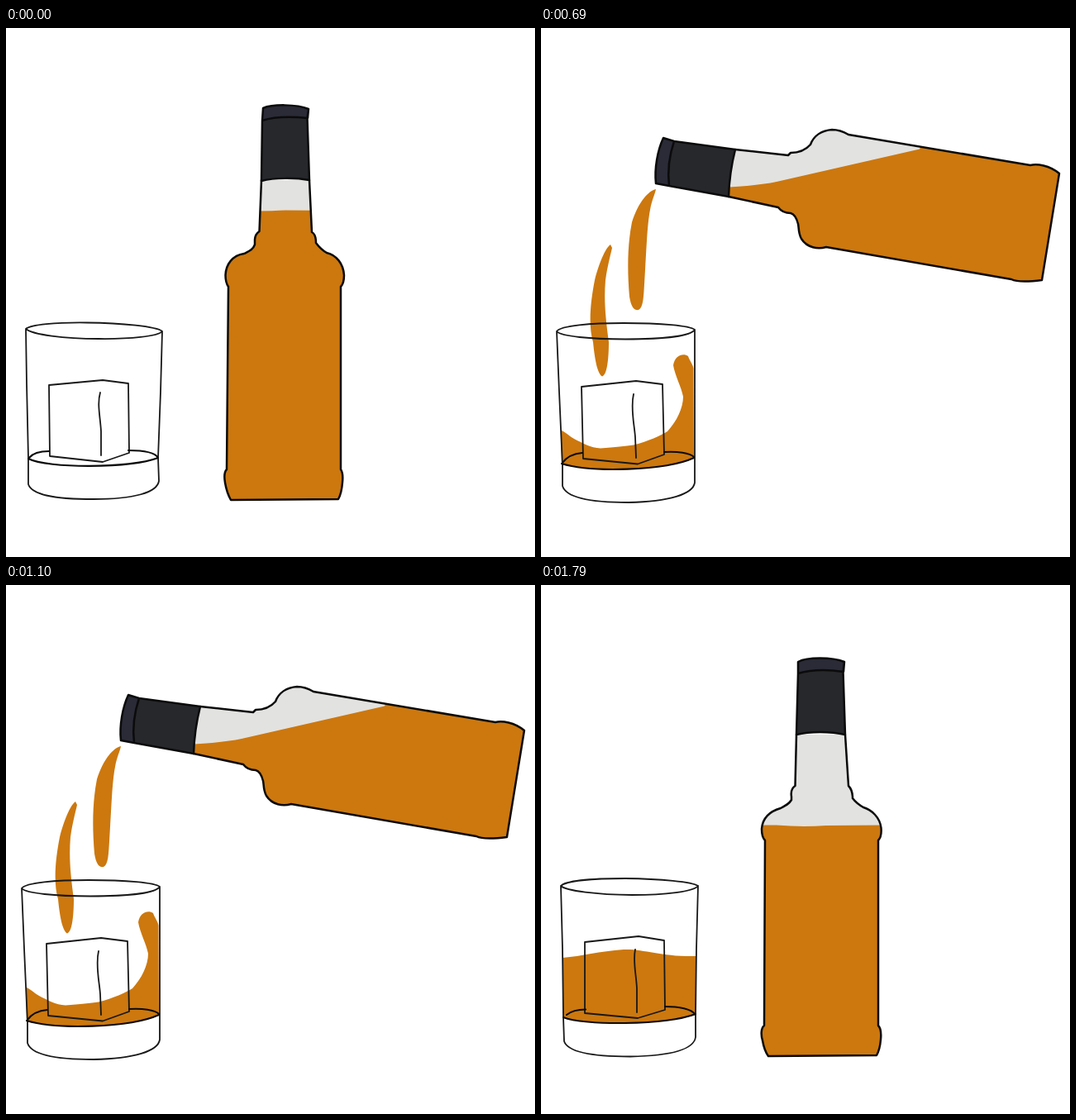
Animation of 640 by 640 pixels, one loop 2.07 s. Source, as an HTML page:

```html
<!DOCTYPE html>
<html lang="en">
<head>
<meta charset="utf-8">
<title>Pouring a drink</title>
<style>
html, body { margin: 0; width: 100%; height: 100%; overflow: hidden; background: #fff; }
svg { display: block; width: 100vw; height: 100vh; }
.line { fill: none; stroke: #0b0b0b; stroke-linecap: round; stroke-linejoin: round; }
.glass { stroke: #181818; stroke-width: 1.8; }
.base { stroke-width: 2.1; }
.bottle { stroke-width: 2.5; }
.drink { fill: #cc780f; }
.empty { fill: #e2e2e0; }
.cap { fill: #27282c; }
.lid { fill: #2a2b37; }
</style>
</head>
<body>
<svg id="stage" viewBox="0 0 640 640"></svg>
<script>
const STEP = 690;

const poses = [
  {
    body: 'M309 184L306.5 246C302 249 301 253 301 257L301 262C299 268 294 270 288 273C274 275 266 286 265.5 299C265.5 306 267 310 269 313L267 534C264 537 264 544 265 550Q267 562 272 571L402 570Q406 563 407 550C408 541 407 537 405 534L405 313C408 310 409 305 409 299C408 285 400 275 388 272C381 268 378 264 375 260C375 253 374 249 370 247L367 184',
    level: 'M250 221.5Q310 222 338 220.5L420 221V580H250Z',
    cap: 'M311 97C322 92 352 92 366 98L364.5 109L367 184C350 181 325 181 309 185L310 112Z',
    lid: 'M311 97C322 92 352 92 366 98L365 109C345 107 325 107 310 112Z',
    fill: '',
    rim: 'M24 364C30 359 60 356 98 356.5C140 357 182 361 189 367C184 373 150 376.5 112 376C70 376 32 371 24 364Z',
    sides: 'M24 364L25 430L27 520L27 552C31 564 55 570 106 570C155 570 183 562 185 548L184 520L187 440L189 367',
    base: 'M27 521C50 533 150 533 184 520M28 520C32 515 40 512 52 512M148 511C165 511 180 513 184 520',
    cube: 'M52 432L117 426L148 430L149 514L117 525L53 518ZM114 441C110 455 114 470 115 488L115 517'
  },
  {
    body: 'M235 147L299 154L302 151C310 151 319 149 326 141C330 130 340 124 352 123C360 123 367 126 372 129L592 166C600 164 615 166 627 176L606 305C590 307 575 307 569 304L345 265C335 268 322 266 315 255C311 248 312 240 311 237C309 229 306 225 302 224C295 224 290 221 287 217L227 204',
    level: 'M220 193L228 192.5C250 191 268 189.5 285 186L458 146.5L470 120H640V320H220Z',
    cap: 'M148 133L161 137L235 147Q228 175 227 204L155 191L139 188C137 170 141 148 148 133Z',
    lid: 'M148 133L161 137C155 155 153 174 155 191L139 188C137 170 141 148 148 133Z',
    fill: 'M24 486.5C31 490 36 495 40 497C50 502 60 508 72 508.5C90 507 102 506 112 504.5C130 500 145 493 153 488C164 476 172 460 172 446C170 435 162 420 160 408C162 396 172 393 178 397C180 403 184 407 184.5 412L185 521C150 535 60 537 25 528Z' +
      'M139 195C130 197 118 210 110 235C105 260 104 290 107 325C109 338 113 342 118 341C124 338 124 325 125 310C127 280 128 240 132 220C134 208 138 201 139 195Z' +
      'M84 262C78 266 70 285 65 305C60 330 57 360 63 380C65 400 68 418 74 421.5C80 420 82 400 82 380C78 350 76 330 78 305C80 290 84 275 86 266Z',
    rim: 'M19 367C24 360 60 357 100 357C145 357 180 360 186 365C181 373 145 376.5 102 376.5C60 376.5 24 373 19 367Z',
    sides: 'M19 367L22 440L26 530L26 554C30 568 60 574 106 574C155 573 184 564 186 550L186 365',
    base: 'M25 527C60 538 150 536 185 520M26 526C31 519 39 515 50 514M149 513C165 512 180 514 185 519',
    cube: 'M49 434L115 427L147 431L149 516L117 527.5L51 521ZM112 443C108 460 113 480 114 495L115 520'
  },
  {
    body: 'M309 181L307.5 243C303 246 302 250 303 256L303 260C300 265 296 267 290 270C276 274 268 283 267 295C267 302 268 306 271 309L270 533C266 536 266 545 268 551Q270 563 275 570L406 569Q410 562 411 550C412 540 411 536 408 533L408 309C411 306 412 300 411.5 294C410 281 400 272 390 269C383 265 380 262 377 258C377 250 375 246 372 243L368 181',
    level: 'M250 290.5H285Q315 293 345 291L420 290.5V580H250Z',
    cap: 'M311 93C322 87 352 87 367 93L365.5 105L368 181C350 177 325 177 309 181L311 107Z',
    lid: 'M311 93C322 87 352 87 367 93L366 105C345 102 325 103 311 107Z',
    fill: 'M26 451C50 449 70 443 100 441C125 440 145 450 188 449L187 520C150 532 50 532 27 523Z',
    rim: 'M24 364C30 358 62 355 102 355C145 355.5 183 359 190 364C185 371 150 375 110 375C68 374.5 30 370 24 364Z',
    sides: 'M24 364L26 440L27 523L28 552C32 564 58 570.5 108 570.5C158 569.5 185 562 187 547L187 520L188 440L190 364',
    base: 'M27 523C50 533 150 533 187 519M31 520C36 516 45 513.5 54 513.5M150 510C167 510 182 513 186 519',
    cube: 'M53 432L118 425L149 430L150 514L117 524L53 518ZM114 441C111 455 115 470 116 488L116 517'
  }
];

const path = (cls, d, extra = '') => `<path class="${cls}" d="${d}" ${extra}/>`;

function drawPose(p, i) {
  return `<g visibility="hidden">
    <clipPath id="body${i}"><path d="${p.body}Z"/></clipPath>
    ${path('empty', p.body + 'Z')}
    ${path('drink', p.level, `clip-path="url(#body${i})"`)}
    ${path('line bottle', p.body)}
    ${path('cap', p.cap)}${path('lid', p.lid)}
    ${path('line bottle', p.cap + p.lid)}
    ${path('drink', p.fill)}
    ${path('line glass', p.rim + p.sides + p.cube)}
    ${path('line base', p.base)}
  </g>`;
}

const stage = document.getElementById('stage');
stage.innerHTML = poses.map(drawPose).join('');
const groups = [...stage.children];
const start = performance.now();

function render(time) {
  const now = Math.floor(Math.max(0, time) / STEP) % poses.length;
  groups.forEach((g, i) => g.setAttribute('visibility', i === now ? 'visible' : 'hidden'));
}

function tick() {
  render(performance.now() - start);
  requestAnimationFrame(tick);
}
render(0);
requestAnimationFrame(tick);
</script>
</body>
</html>
```
